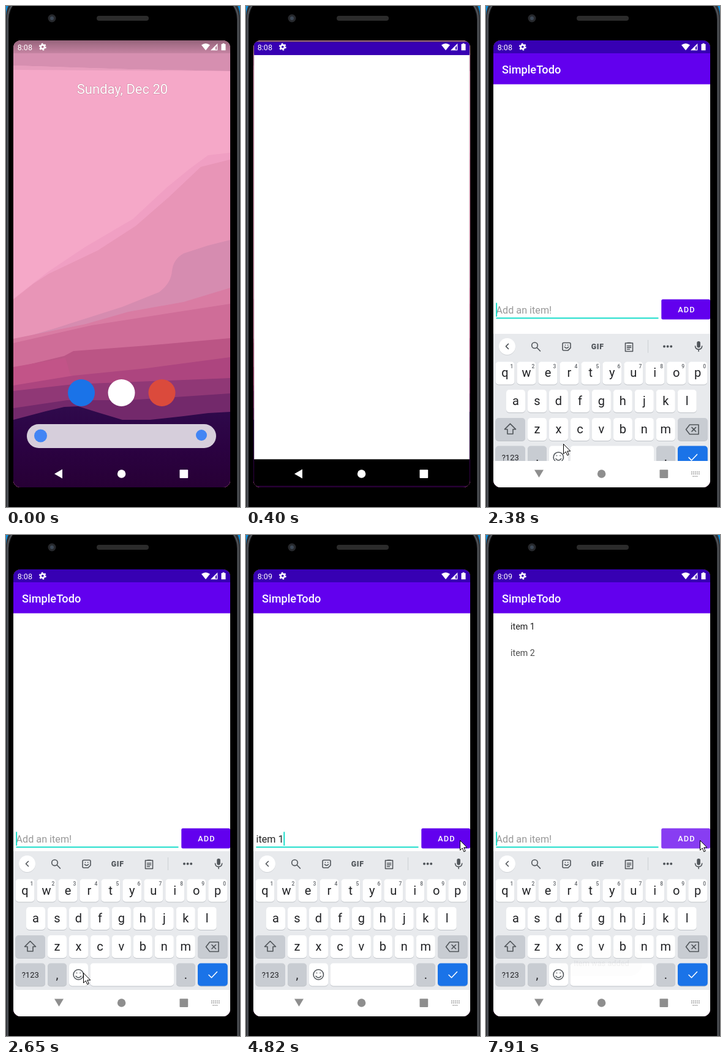
Animation of 382 by 816 pixels, one loop 8 s. Source, as an HTML page:

```html
<!DOCTYPE html>
<html lang="en">
<head>
<meta charset="utf-8">
<title>Todo app</title>
<style>
html, body { margin: 0; height: 100%; overflow: hidden; background: #000; }
svg { display: block; width: 100%; height: 100%; font-family: Roboto, sans-serif; }
text { white-space: pre; }
.mid { text-anchor: middle; }
.bold { font-weight: 500; }
.line { fill: none; stroke: #50555a; stroke-width: 1.6; stroke-linecap: round; stroke-linejoin: round; }
.rule { stroke: #cdd0d4; }
</style>
</head>
<body>
<svg viewBox="0 0 382 816" preserveAspectRatio="none">
<defs>
  <clipPath id="screen"><rect x="12" y="56" width="354" height="728" rx="12"/></clipPath>
  <linearGradient id="shade" x2="0" y2="1">
    <stop stop-color="#000" stop-opacity=".3"/><stop offset="1" stop-color="#000" stop-opacity=".08"/>
  </linearGradient>
  <linearGradient id="night" x2="0" y2="1">
    <stop stop-color="#2f0a4c"/><stop offset=".5" stop-color="#2b0242"/><stop offset="1" stop-color="#270035"/>
  </linearGradient>
</defs>

<!-- phone -->
<rect width="382" height="816" fill="#0b8fdd"/>
<rect y="-18" width="382" height="900" rx="34" fill="#303236"/>
<rect x="2.5" y="-16" width="376.5" height="900" rx="37" fill="none" stroke="#5a5d62" stroke-width="1.5"/>
<rect x="4.5" y="-18" width="372.5" height="900" rx="40"/>
<circle cx="75" cy="20" r="6.5" fill="#26282c"/>
<circle cx="75" cy="20" r="3" fill="#3c4856"/>
<rect x="148" y="16" width="85" height="8" rx="4" fill="#2b2b2b"/>

<g clip-path="url(#screen)">
  <g id="home">
    <rect x="12" y="56" width="354" height="728" fill="#f5a8c8"/>
    <path d="M12 56H366V106L200 103 12 97Z" fill="#d68fb0"/>
    <path d="M12 97L200 103 366 106 12 104Z" fill="#e79dbd"/>
    <path d="M12 477L40 455 70 432 130 392 207 347 262 296 300 265 330 243 366 239V784H12Z" fill="#f09fc3"/>
    <path d="M12 478L45 452 70 436 150 398 212 358 265 312 318 262 366 250V784H12Z" fill="#e895b7"/>
    <path d="M366 381L330 390 290 403Q273 412 271 432T250 466L190 490 80 525 12 545V784H366Z" fill="#d68cb0"/>
    <path d="M12 542L130 518 200 498 290 482 366 459V784H12Z" fill="#d97ca3"/>
    <path d="M12 549L140 520 366 485V784H12Z" fill="#cf6d98"/>
    <path d="M12 590L95 570 110 562 230 553 366 541V784H12Z" fill="#bb5585"/>
    <path d="M12 588L97 573 105 600 120 608 12 622Z" fill="#c25488"/>
    <path d="M12 618L110 602 230 590 366 572V784H12Z" fill="#ad457f"/>
    <path d="M12 627L110 616 366 606V784H12Z" fill="#903876"/>
    <path d="M12 655L100 642 200 642 366 631V784H12Z" fill="#73296b"/>
    <path d="M12 674L65 660 95 653 118 652 150 662 190 674 235 674 290 668 330 663 366 661V784H12Z" fill="url(#night)"/>
    <rect x="12" y="56" width="354" height="21" fill="url(#shade)"/>
    <text class="mid" x="190" y="143" font-size="22" fill="#fff" stroke="#845" stroke-opacity=".4" paint-order="stroke">Sunday, Dec 20</text>
    <circle cx="123" cy="630" r="22" fill="#1a73e8"/>
    <circle cx="188.5" cy="630" r="22" fill="#fff"/>
    <circle cx="254.5" cy="630" r="22" fill="#db4a3c"/>
    <rect x="34" y="681" width="309" height="39" rx="19.5" fill="#d6cedb"/>
    <circle cx="56.5" cy="700" r="10.5" fill="#4285f4"/>
    <circle cx="319" cy="699" r="9" fill="#4285f4"/>
  </g>

  <g id="app">
    <rect x="12" y="56" width="354" height="728"/>
    <rect x="12" y="77" width="354" height="663.5" fill="#fff"/>
    <rect x="12" y="56" width="354" height="21.5" fill="#3700b3"/>
    <g id="content">
      <rect x="12" y="77" width="354" height="50.5" fill="#6200ee"/>
      <text class="bold" x="26" y="110" font-size="18.2" fill="#fff">SimpleTodo</text>
      <g font-size="14.3" fill="#222">
        <text id="item1" x="40" y="154">item 1</text>
        <text id="item2" x="40" y="197">item 2</text>
      </g>
      <g id="row">
        <text id="hint" x="16.5" y="725.3" font-size="16.2" fill="#999">Add an item!</text>
        <text id="entry" x="16.5" y="725.3" font-size="16.2" fill="#222"></text>
        <rect id="compose" x="17" y="727" height="1" fill="#222"/>
        <rect id="field" x="16.5" width="265"/>
        <rect id="caret" y="708" width="1.8" height="22.5" fill="#03dac5"/>
        <rect x="286.3" y="702.3" width="79.7" height="32.8" rx="2.5" fill="#6200ee"/>
        <rect id="press" x="286.3" y="702.3" width="79.7" height="32.8" rx="2.5" fill="#fff"/>
        <text class="mid bold" x="327.5" y="723.8" font-size="12.7" letter-spacing="1.2" fill="#fff">ADD</text>
      </g>
    </g>
  </g>

  <g id="board">
    <rect x="12" y="515" width="354" height="270" fill="#e8eaed"/>
    <circle cx="34.5" cy="536.5" r="13.5" fill="#d0d3d7"/>
    <circle cx="34.5" cy="535.5" r="13.5" fill="#fff"/>
    <path id="chevron" class="line" d="M2 -4L-2 0 2 4"/>
    <g id="tools">
      <circle class="line" cx="79.5" cy="533.8" r="4.8"/>
      <path class="line" d="M83.2 537.5L88.5 543"/>
      <path class="line" d="M127 529.5H136Q138 529.5 138 531.5V538L134 542H127Q125 542 125 540V531.5Q125 529.5 127 529.5ZM128.5 536.5Q131.5 540 134.5 536.5M129.5 533.3V533.5M133.7 533.3V533.5"/>
      <text class="mid" x="182.3" y="539.6" font-size="12.3" font-weight="900" letter-spacing=".8" fill="#50555a">GIF</text>
      <path class="line" d="M227.5 530H239.5V543.5H227.5ZM231 529.5H236M230.5 534.5H236.5M230.5 537.2H236.5M230.5 540H234.5"/>
      <path class="rule" d="M264.5 525V546"/>
      <path d="M291 535.5h0m5.6 0h0m5.6 0h0" stroke="#50555a" stroke-width="4" stroke-linecap="round"/>
    </g>
    <g id="words" class="mid" font-size="16.5" fill="#50555a">
      <text x="90.5" y="542">item</text><text x="188" y="542">items</text><text x="284.5" y="542">itemized</text>
      <path class="rule" d="M136.5 524V546M239.5 524V546"/>
    </g>
    <rect x="344.3" y="527" width="5.6" height="10.5" rx="2.8" fill="#50555a"/>
    <path class="line" d="M341.5 535Q342 540.3 347.1 540.3T352.7 535M347.1 540.5V543.5"/>
    <g id="keys"></g>
    <path class="line" d="M39.5 661.5L48.5 670.5H44V678H35V670.5H30.5Z"/>
    <path class="line" d="M332.5 663H347V678.5H332.5L326.5 670.8ZM336 667.5L342.5 674M342.5 667.5L336 674"/>
    <circle class="line" cx="118.3" cy="716" r="8.2"/>
    <path class="line" d="M114 718.5Q118.3 723.5 122.6 718.5M115.5 713.3V713.5M121.1 713.3V713.5"/>
    <path class="line" d="M331 716.5L335.5 721 344.5 711.5" style="stroke:#fff"/>
  </g>

  <g id="bar">
    <rect x="12" y="741" width="354" height="43" fill="#fff"/>
    <path d="M335 759H349M335 762H349M337.5 766H346.5" stroke="#8e8e8e" stroke-width="1.6" stroke-dasharray="1.7 1.3"/>
  </g>
  <g id="nav">
    <path id="back"/>
    <circle cx="188.6" cy="762" r="6.7"/>
    <rect x="283.5" y="755.2" width="13.7" height="13.7" rx="1"/>
  </g>

  <g fill="#fff">
    <text id="clock" x="18.7" y="71.6" font-size="12.6"></text>
    <g fill="none" stroke="#fff">
      <circle cx="59.8" cy="66.6" r="3.2" stroke-width="2.6"/>
      <circle cx="59.8" cy="66.6" r="5" stroke-width="2" stroke-dasharray="2.6 2.636"/>
    </g>
    <path d="M319 63.5Q326 58.5 333 63.5L326 72.3Z"/>
    <path d="M334 72.3L345.3 61V72.3ZM342 67V71H344V65Z" fill-rule="evenodd"/>
    <path d="M351.5 62H353.5V60.8H356.5V62H358.5V72.3H351.5Z"/>
  </g>

  <g id="toast">
    <rect x="121.5" y="675" width="133.5" height="43.5" rx="21" fill="#ebebec" fill-opacity=".95"/>
    <text class="mid" x="188.5" y="702" font-size="12.8" fill="#333">Item was added</text>
  </g>
</g>
<path id="mouse" d="M.5 .5V16.5L4.2 13 6.7 18.8 9.2 17.8 6.7 12H11.8Z" fill="#fff" stroke="#000"/>
</svg>

<script>
const $ = id => document.getElementById(id);
const set = (id, attrs) => { for (const k in attrs) $(id).setAttribute(k, attrs[k]); };
const show = (id, on) => set(id, { visibility: on ? 'visible' : 'hidden' });
const ramp = (t, a, b) => Math.min(1, Math.max(0, (t - a) / (b - a)));

// Keyboard
const GREY = '#c8ccd2', STEP = 34.97;
const key = (x, y, w, label = '', fill = '#fff', size = 20) =>
  `<rect x="${x}" y="${y + 1}" width="${w}" height="37" rx="5" fill="#bfc3c8"/>
   <rect x="${x}" y="${y}" width="${w}" height="37" rx="5" fill="${fill}"/>
   <text class="mid" x="${x + w / 2}" y="${y + (size < 20 ? 23.5 : 25)}" font-size="${size}" fill="#202124">${label}</text>`;
let keys = '';
[['qwertyuiop', 15.5, 560.5], ['asdfghjkl', 33, 606], ['zxcvbnm', 68, 652]].forEach(([row, x0, y], r) =>
  [...row].forEach((c, i) => {
    const x = x0 + i * STEP;
    keys += key(x, y, 31, c);
    if (!r) keys += `<text class="mid bold" x="${x + 26.5}" y="571" font-size="8.5" fill="#5f6368">${(i + 1) % 10}</text>`;
  }));
$('keys').innerHTML = keys + key(15.5, 652, 48.5, '', GREY) + key(313, 652, 48.8, '', GREY) +
  key(15.5, 697.5, 48.5, '?123', GREY, 13) + key(68, 697.5, 31, ',', GREY) + key(103, 697.5, 31) +
  key(137.5, 697.5, 136.5) + key(278, 697.5, 31, '.', GREY) + key(313, 697.5, 48.8, '', '#1a73e8');

// The picture only refreshes at these times
const cuts = [0, 250, 400, 520, 790, 940, 1100, 1270, 1420, 1570, 1720, 1870, 2000, 2130, 2260, 2390,
  2520, 2650, 2770, 3200, 3330, 3460, 3590, 3730, 3860, 4170, 4450, 4820, 4970, 5090, 5220, 5350, 5470,
  5600, 6030, 6160, 6290, 6430, 6570, 6690, 6970, 7200, 7290, 7390, 7480, 7760, 7910];
const caretOff = [[2770, 3200], [4450, 4820], [5600, 6030], [7200, 7760]];
const path = [[1100, 232, 335], [1270, 217, 381], [1420, 190, 500], [1570, 150, 640], [1720, 126, 713], [4820, 349, 497]];
const FOCUS = 1870, RAISE = 2000, ADD1 = 5090, ADD2 = 7910;

function draw(t) {
  // launch
  const s = t < 400 ? .95 : t < 520 ? .993 : 1;
  show('app', t >= 250);
  set('app', { transform: `translate(189 420) scale(${s}) translate(-189 -420)`, opacity: t < 400 ? .7 : 1 });
  set('content', { display: t < 790 ? 'none' : 'inline' });
  $('clock').textContent = t < 4450 ? '8:08' : '8:09';

  // keyboard and navigation
  const up = t >= RAISE, slide = 269 * (1 - ramp(t, 1900, 2390)) ** 2;
  show('board', up);
  show('bar', up);
  set('board', { transform: `translate(0 ${slide})` });
  set('row', { transform: `translate(0 ${up ? -224.5 : 0})` });
  set('back', { d: up ? 'M79 755.5H94L86.5 768Z' : 'M92 754.5V769.5L79 762Z' });
  set('nav', { fill: up ? '#8e8e8e' : t < 940 ? '#fff' : t < 1100 ? '#ddd' : '#c4c4c4' });

  // typing
  const count = start => Math.min(6, Math.max(0, Math.floor((t - start) / 130) + 1));
  const text = t < ADD1 ? 'item 1'.slice(0, count(3200)) : t < ADD2 ? 'item 2'.slice(0, count(6030)) : '';
  const n = text.length, entry = $('entry');
  entry.textContent = text.trimEnd();
  const word = n ? entry.getComputedTextLength() : 0;
  const typing = n > 0 && n < 6;
  const pause = n === 6 && (t < 4170 || t >= 6690 && t < 6970);
  const blink = caretOff.some(([a, b]) => t >= a && t < b);
  set('hint', { opacity: n ? 0 : 1 });
  set('compose', { width: typing ? word : 0 });
  set('caret', { x: 16.3 + word + (n === 5 ? 4 : 0), opacity: t >= FOCUS && !blink ? 1 : 0 });
  set('field', t < FOCUS ? { y: 732, height: 1, fill: '#777' } : { y: 732, height: 1.8, fill: '#03dac5' });
  set('words', { opacity: typing ? 1 : 0 });
  set('tools', { opacity: typing || pause ? 0 : 1 });
  set('chevron', { transform: `translate(34.5 535.5) scale(${typing || pause ? -1 : 1} 1)` });

  // adding
  const ripple = start => t < start ? 0 : .24 * (1 - ramp(t, start + 200, start + 500));
  set('press', { opacity: ripple(4970) + ripple(7760) });
  set('item1', { opacity: t < ADD1 ? 0 : t < 5220 ? .8 : 1 });
  set('item2', { opacity: t < ADD2 ? 0 : .8 });
  set('toast', { opacity: ramp(t, ADD1, 5470) * (1 - .93 * ramp(t, 7150, 7480)) });

  // pointer
  const spot = t >= 4450 && t < 4820 ? null : path.filter(p => p[0] <= t).pop();
  show('mouse', spot);
  if (spot) set('mouse', { transform: `translate(${spot[1]} ${spot[2]})` });
}

function frame() {
  const t = performance.now() % 8000;
  draw(cuts.filter(c => c <= t).pop());
  requestAnimationFrame(frame);
}
frame();
</script>
</body>
</html>
```
